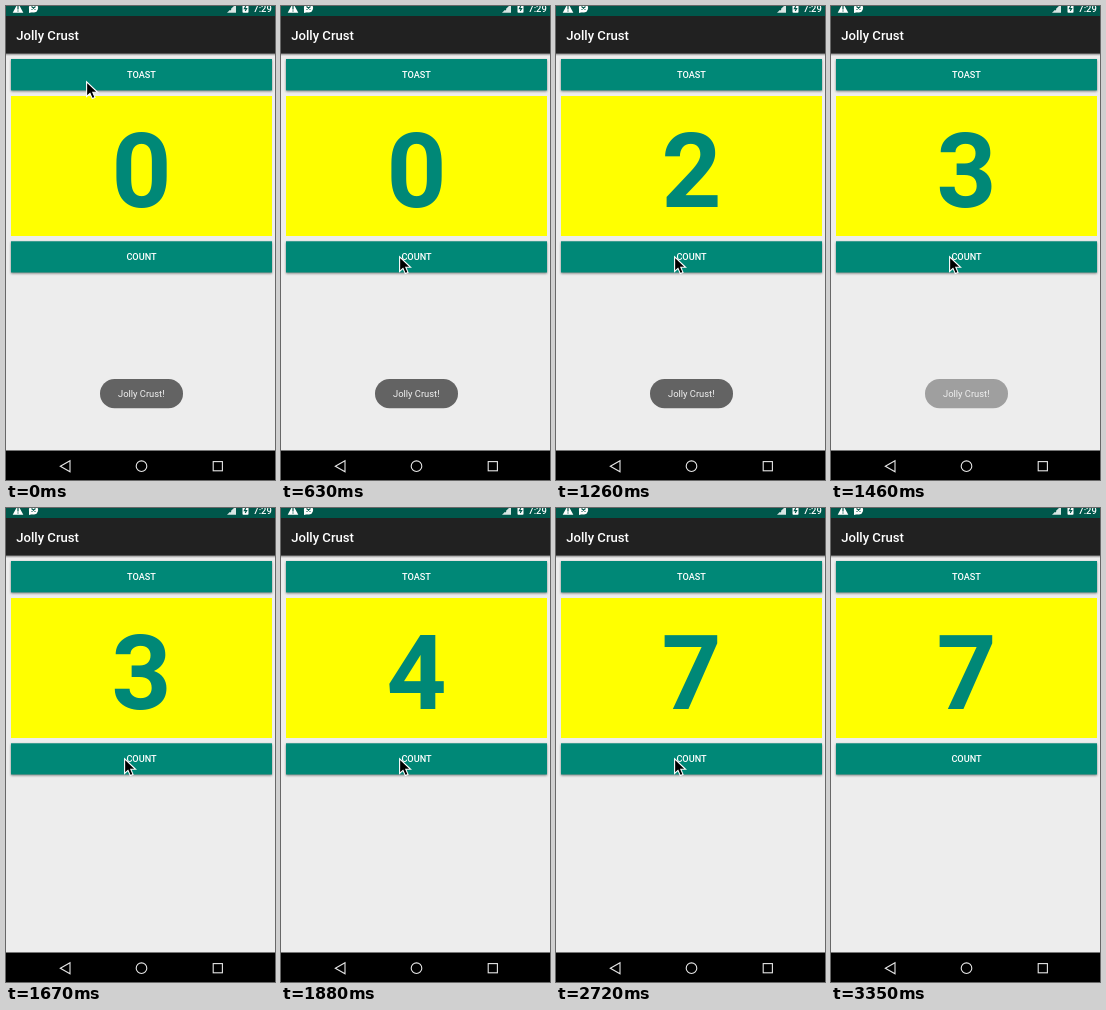
An HTML page that plays this animation: 269 px wide and 474 px high, repeating every 3.78 s.

```html
<!DOCTYPE html>
<html lang="en">
<head>
<meta charset="utf-8">
<title>Counter app</title>
<style>
  html, body { margin: 0; height: 100%; overflow: hidden; background: #ededed; }
  svg { display: block; width: 100vw; height: 100vh; font-family: Roboto, sans-serif; }
  .label { font-size: 9.16px; font-weight: 500; fill: #fff; text-anchor: middle; }
  .button { fill: #008877; filter: drop-shadow(0 1px .8px #0007); }
  .line { fill: none; stroke: #e6e6e6; stroke-width: 1.1; }
</style>
</head>
<body>
<svg viewBox="0 0 269 474">
  <defs>
    <linearGradient id="shade" x2="0" y2="1">
      <stop stop-color="#777"/>
      <stop offset="1" stop-color="#ededed"/>
    </linearGradient>
  </defs>
  <rect width="269" height="474" fill="#ededed"/>

  <!-- status bar and title -->
  <rect y="47" width="269" height="3" fill="url(#shade)"/>
  <rect y="9" width="269" height="38.5" fill="#212121"/>
  <rect width="269" height="10" fill="#00574b"/>
  <g fill="#fff">
    <path d="M12 -3L17.3 6.7H6.7Z"/>
    <circle cx="27.5" cy="2" r="4.6"/>
    <path d="M23 2V7L27 6Z"/>
    <path d="M230 -2V6.7H221Z" opacity=".85"/>
    <rect x="236.5" y="-2" width="6" height="8.8" rx=".8"/>
    <text x="247.3" y="6" font-size="9.4" font-weight="500">7:29</text>
    <text x="10.3" y="34" font-size="13.1" font-weight="500">Jolly Crust</text>
  </g>
  <g fill="none" stroke="#00574b" stroke-width="1.2">
    <path d="M12 0V3.4M12 4.4V5.6"/>
    <path d="M25.5 .5L29.5 3.5M29.5 .5L25.5 3.5"/>
    <path d="M220 0L225 4M239.8 0L238.4 2.6H240.6L239.2 5"/>
  </g>

  <!-- buttons and counter -->
  <rect class="button" x="5" y="53" width="261" height="31.4"/>
  <rect x="5" y="90" width="261" height="140" fill="#ff0"/>
  <rect class="button" x="5" y="235.3" width="261" height="31.2"/>
  <text class="label" x="135.5" y="72.2">TOAST</text>
  <text class="label" x="135.5" y="254.4">COUNT</text>
  <text id="count" x="135.5" y="201.2" font-size="104.7" font-weight="700"
        fill="#008877" text-anchor="middle">0</text>

  <g id="toast">
    <rect x="94" y="373" width="83" height="29.3" rx="14.6" fill="#636363"/>
    <text x="135.3" y="391.3" font-size="9.4" fill="#f2f2f2" text-anchor="middle">Jolly Crust!</text>
  </g>

  <!-- navigation bar -->
  <rect y="444.5" width="269" height="30" fill="#000"/>
  <path class="line" d="M64 454.7V465.7L54.3 460.2Z"/>
  <circle class="line" cx="135.5" cy="460.2" r="5.3"/>
  <rect class="line" x="207.2" y="455.6" width="9.2" height="9.2"/>

  <path id="cursor" d="M.6 .8V15.4L4 12.3L6.3 17.6L9 16.4L6.8 11.3H11.6Z"
        fill="#000" stroke="#fff" stroke-width="1.1"/>
</svg>
<script>
  const LOOP = 3780;
  const taps = [1050, 1260, 1460, 1880, 2090, 2300, 2720];
  const cursorStops = [
    [0, 80, 75], [210, 77, 277], [420, 115, 258],
    [630, 118, 250], [2930, 163, 415], [3140, 210, 458]
  ];
  const cursorExit = 3350;
  const [count, toast, cursor] = ["count", "toast", "cursor"].map(id => document.getElementById(id));

  function draw(t) {
    count.textContent = taps.filter(tap => tap <= t).length;
    toast.setAttribute("opacity", t < 1460 ? 1 : t < 1670 ? 0.56 : 0);
    const [, x, y] = cursorStops.findLast(([start]) => start <= t);
    cursor.setAttribute("transform", `translate(${x} ${y})`);
    cursor.setAttribute("visibility", t < cursorExit ? "visible" : "hidden");
  }

  const begin = performance.now();
  function tick() {
    draw((performance.now() - begin) % LOOP);
    requestAnimationFrame(tick);
  }
  tick();
</script>
</body>
</html>
```
